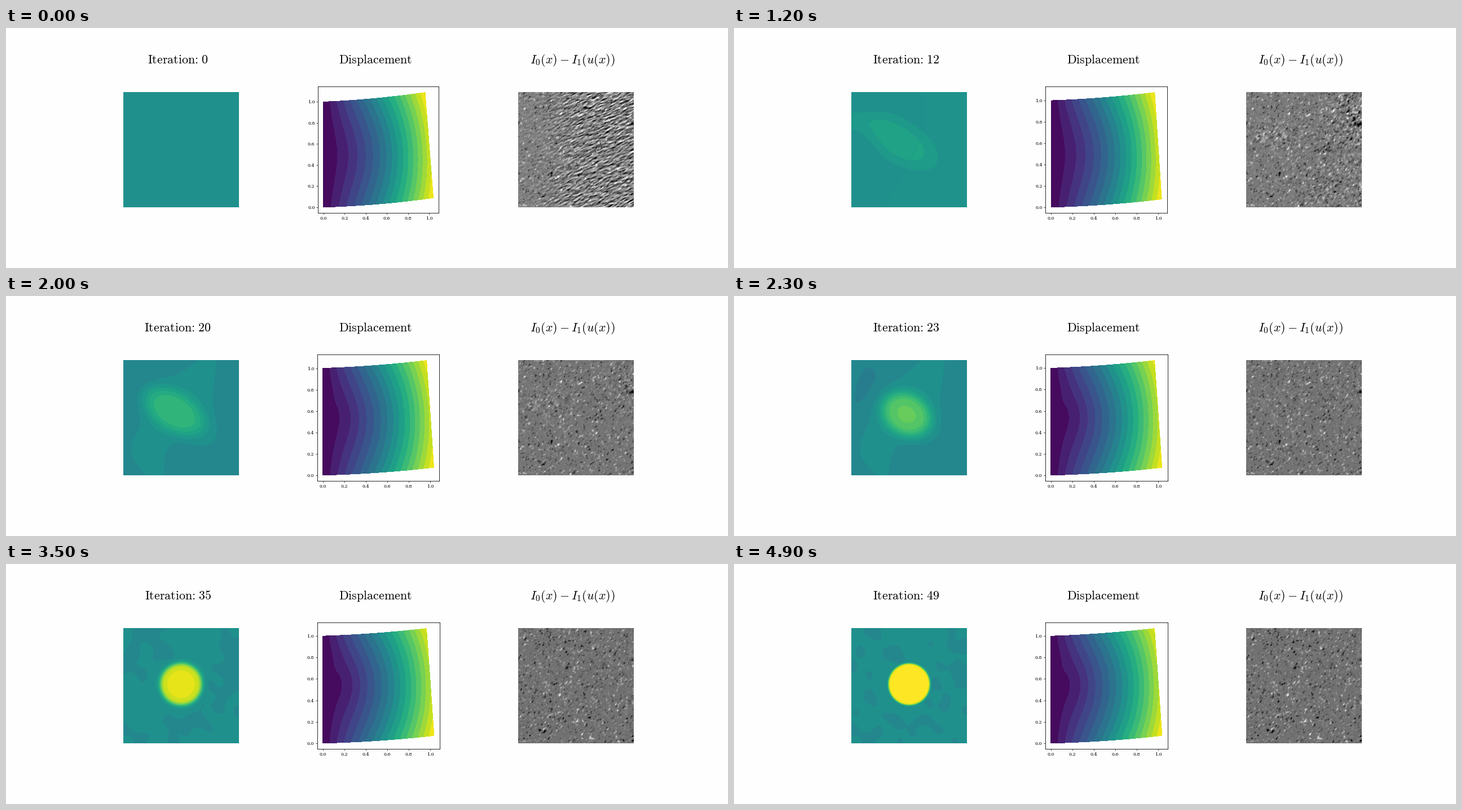
A matplotlib script for the animation above (5 s loop, 1280 px wide and 427 px high).

```python
import numpy as np
import matplotlib.pyplot as plt
from matplotlib.animation import FuncAnimation

W, H, DPI = 1280, 427, 100
FRAMES = 50
BACK = "#fefefe"
plt.rcParams.update({"font.family": "DejaVu Serif", "mathtext.fontset": "cm"})

# the small surplus keeps the pixel height from being rounded down
fig = plt.figure(figsize=(W / DPI, (H + 1e-3) / DPI), dpi=DPI, facecolor=BACK)
rng = np.random.default_rng(11)


def px_rect(x0, y0, x1, y1):
    return [x0 / W, 1 - y1 / H, (x1 - x0) / W, (y1 - y0) / H]


def title(x, s=""):
    return fig.text(x / W, 1 - 62.5 / H, s, size=15.8, ha="center", va="baseline")


def ramp(k, a, b):
    t = min(max((k - a) / (b - a), 0), 1)
    return t * t * (3 - 2 * t)


def bump(x, y, cx, cy, sx, sy):
    return np.exp(-((x - cx) / sx) ** 2 - ((y - cy) / sy) ** 2)


count = title(305)
title(655.3, r"$\text{Displacement}$")
title(1004.5, r"$I_0(x) - I_1(u(x))$")


# Parameter field: a soft blob that sharpens into a disc
N = 410
STEP = 1 / 26
fx, fy = np.meshgrid((np.arange(N) + 0.5) / N, (np.arange(N) + 0.5) / N)


def waves(n, low, high):
    ang = rng.uniform(0, 2 * np.pi, n)
    freq = rng.uniform(low, high, n) * 2 * np.pi
    return freq * np.cos(ang), freq * np.sin(ang), rng.uniform(0, 2 * np.pi, n)


def mottle(ws, k, drift):
    total = sum(np.cos(a * fx + b * fy + p + drift * k * (-1) ** i)
                for i, (a, b, p) in enumerate(zip(*ws)))
    return total / np.sqrt(len(ws[0]))


BROAD = waves(7, 0.8, 2.2)
FINE = waves(14, 3, 7)


def field(k):
    if k < 7:
        return np.full((N, N), 0.5)
    on = ramp(k, 8, 17)
    disc = ramp(k, 18, 26)

    def mix(blob, circle):
        return blob + (circle - blob) * disc

    tilt = np.radians(32)
    dx, dy = fx - mix(0.43, 0.5), fy - mix(0.44, 0.49)
    u = (dx * np.cos(tilt) + dy * np.sin(tilt)) / mix(0.29, 0.18)
    v = (dy * np.cos(tilt) - dx * np.sin(tilt)) / mix(0.15, 0.18)
    soft = np.interp(k, [16, 20, 27, 35, 49], [0.26, 0.2, 0.13, 0.07, 0.025])
    shape = 1 / (1 + np.exp(np.clip((np.hypot(u, v) - 1) / soft, -40, 40)))

    level = np.interp(k, [8, 16, 20, 27, 35, 49], [0, 0.19, 0.2, 0.4, 0.46, 0.52])
    base = 0.5 - on * np.interp(k, [16, 27, 35], [0.025, 0.03, 0.014])
    f = base + level * shape
    f += 0.11 * on * (1 - ramp(k, 15, 20)) * bump(fx, fy, 0.05, 0.26, 0.25, 0.12)
    rough = 1 - shape
    f += on * rough * 0.017 * (1 - 0.75 * ramp(k, 24, 40)) * mottle(BROAD, k, 0.06)
    f += rough * 0.011 * ramp(k, 24, 40) * mottle(FINE, k, 0.03)
    f = np.clip(np.round(f / STEP) * STEP, 0, 1)
    if k < 13:
        edge = 0.64 - 0.36 * np.clip((fy - 0.3) / 0.7, 0, 1) ** 1.3
        f += 0.012 * (fx > edge)
    return f


ax_field = fig.add_axes(px_rect(207.5, 114, 412.5, 319))
ax_field.axis("off")
im_field = ax_field.imshow(field(0), cmap="viridis", vmin=0, vmax=1,
                           aspect="auto", interpolation_stage="rgba")


# Deformed unit square coloured by the length of the displacement
mx, my = np.meshgrid(np.linspace(0, 1, 70), np.linspace(0, 1, 70))
ax_disp = fig.add_axes(px_rect(553, 104.5, 767, 329), facecolor=BACK)
ax_disp.tick_params(width=0.5, length=2, pad=2, labelsize=5.8)
for spine in ax_disp.spines.values():
    spine.set_linewidth(0.6)
ax_disp.set_xticks(np.arange(0, 1.1, 0.2))
ax_disp.set_yticks(np.arange(0, 1.1, 0.2))
bands = None


def draw_displacement(k):
    global bands
    lift = np.interp(k, [0, 7, 16, 27, 49], [0.089, 0.078, 0.074, 0.0705, 0.071])
    turn = np.interp(k, [0, 7, 27, 49], [0.039, 0.032, 0.035, 0.035])
    stiff = ramp(k, 12, 27)
    ux = turn * (1 - 2 * my) * (1 - (1 - mx) ** 2)
    uy = lift * (0.4 * mx + 0.6 * mx ** 2)
    hold = (0.28 * bump(mx, my, 0.16, 0.55, 0.16, 0.2)
            - 0.16 * bump(mx, my, 0.1, 0.7, 0.09, 0.07))
    size = np.hypot(ux + 0.004 * stiff * mx, uy) * (1 - stiff * hold)

    if bands is not None:
        bands.remove()
    bands = ax_disp.contourf(mx + ux, my + uy, size, cmap="viridis",
                             levels=np.linspace(0, size.max() * 1.0001, 18))
    right, top = 1 + turn, 1 + lift
    half = 224.5 * right / top / 2
    ax_disp.set_position(px_rect(660.2 - half, 104.5, 660.2 + half, 329))
    ax_disp.set_xlim(-0.05 * right, 1.05 * right)
    ax_disp.set_ylim(-0.05 * top, 1.05 * top)


# Residual image: streaks that fade into sparse specks
M = 205
rx, ry = np.meshgrid((np.arange(M) + 0.5) / M, (np.arange(M) + 0.5) / M)


def grain(along, across, degrees):
    t = np.radians(degrees)
    qx, qy = np.meshgrid(np.fft.fftfreq(M), np.fft.fftfreq(M))
    a = qx * np.cos(t) - qy * np.sin(t)
    b = qx * np.sin(t) + qy * np.cos(t)
    gain = np.exp(-2 * np.pi ** 2 * ((a * along) ** 2 + (b * across) ** 2))
    g = np.fft.ifft2(np.fft.fft2(rng.normal(size=(M, M))) * gain).real
    return g / g.std()


def sparse(g, cut):
    return np.sign(g) * np.maximum(np.abs(g) - cut, 0)


streaks = grain(2.6, 0.95, 28)
streaks = (streaks - np.roll(streaks, 2, axis=0)) * 0.75
specks = sparse(grain(1.6, 0.95, 40), 0.45) * 1.3
rest = sparse(grain(1.5, 0.9, 45), 1.15)
late = sparse(grain(1.5, 0.9, 45), 1.15)


def residual(k):
    amp = np.interp(k, [0, 7, 12, 16, 22], [1, 0.72, 0.35, 0.1, 0])
    m = np.exp(-k / 4)
    reach = rx + (1 - m) * 0.35 * (ry - 0.5)
    weight = 0.12 + 0.88 / (1 + np.exp(-(reach - 0.36 - 0.16 * (1 - m)) / 0.09))
    hot = bump(rx, ry, 0.22, 0.37, 0.2, 0.1) + bump(rx, ry, 0.93, 0.2, 0.12, 0.25)
    hot = 0.55 * hot * ramp(k, 4, 12) * (1 - ramp(k, 16, 26))
    s = ramp(k, 16, 40)
    g = 0.5 - 0.055 * ramp(k, 0, 30)
    g = g + 0.21 * amp * weight * (m * streaks + (1 - m) * specks)
    g += 0.2 * hot * specks
    g += 0.2 * ((1 - 0.6 * s) * rest + (0.3 + 0.7 * s) * late)
    return np.clip(g, 0, 1)


ax_res = fig.add_axes(px_rect(907.5, 114, 1112.5, 319))
ax_res.axis("off")
im_res = ax_res.imshow(residual(0), cmap="gray", vmin=0, vmax=1, aspect="auto")


def update(k):
    count.set_text(r"$\text{Iteration:}\ \mathrm{%d}$" % k)
    im_field.set_data(field(k))
    draw_displacement(k)
    im_res.set_data(residual(k))
    return []


anim = FuncAnimation(fig, update, frames=FRAMES, interval=100,
                     repeat=True, repeat_delay=0)
plt.show()
```
